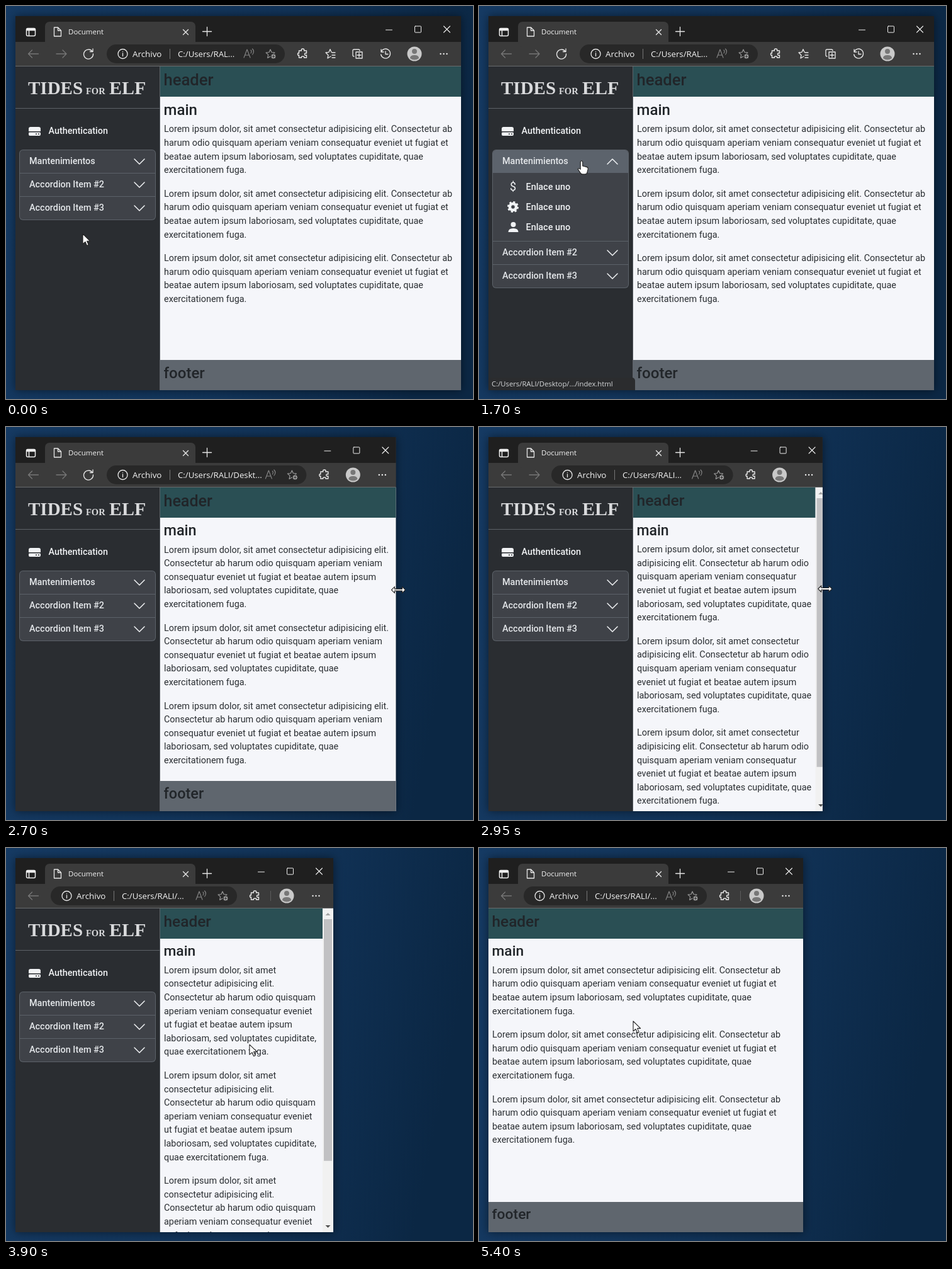
Animation, 742 px wide and 624 px high, one loop 5.55 s. Source, as an HTML page with a canvas:

```html
<!DOCTYPE html>
<html lang="es">
<head>
<meta charset="utf-8">
<title>Responsive sidebar</title>
<style>
html, body { margin: 0; width: 742px; height: 624px; overflow: hidden; background: #10305a }
canvas { display: block }
</style>
</head>
<body>
<canvas id="stage" width="742" height="624"></canvas>
<script>
const c = document.getElementById('stage').getContext('2d');
const LOOP = 5550, LEFT = 15, TOP = 96, BOTTOM = 610;
const UI = '"Open Sans", "Noto Sans", sans-serif', BODY = 'Roboto, sans-serif';
const LOREM = ('Lorem ipsum dolor, sit amet consectetur adipisicing elit. Consectetur ab harum odio ' +
  'quisquam aperiam veniam consequatur eveniet ut fugiat et beatae autem ipsum laboriosam, ' +
  'sed voluptates cupiditate, quae exercitationem fuga.').split(' ');

// Right edge of the window: [time, x]
const EDGE = [[2350, 723], [2950, 546], [3150, 515], [3300, 515], [3420, 520], [4600, 520], [4660, 515],
  [4760, 515], [4820, 520], [4900, 520], [4960, 515]];
// Pointer hot spot: [time, x, y]
const POINTER = [[0, 122, 362], [120, 122, 350], [500, 128, 202], [780, 130, 200], [1000, 159, 245],
  [1180, 159, 245], [1350, 115, 288], [1500, 112, 318], [1660, 162, 246], [1780, 164, 246],
  [2150, 727, 261], [2350, 727, 261], [2950, 550, 257], [3150, 519, 258], [3300, 519, 258],
  [3420, 524, 260], [3500, 505, 268], [3900, 387, 312], [4150, 375, 322], [4400, 510, 283],
  [4550, 524, 285], [4600, 524, 285], [4660, 519, 285], [4760, 519, 285], [4820, 524, 284],
  [4900, 524, 284], [4960, 519, 284], [5050, 519, 284], [5300, 376, 279], [5350, 300, 273], [5400, 245, 275]];
const STATUS = [[500, 0], [580, 1], [1100, 1], [1200, 0], [1380, 0], [1440, 1], [1720, 1], [1820, 0]];

function at(keys, t, i = 1) {
  const n = keys.findIndex(k => k[0] > t);
  if (n < 0) return keys[keys.length - 1][i];
  if (n === 0) return keys[0][i];
  const a = keys[n - 1], b = keys[n];
  return a[i] + (b[i] - a[i]) * (t - a[0]) / (b[0] - a[0]);
}
const clamp = v => Math.max(0, Math.min(1, v));

function rect(x, y, w, h, fill, radius = 0) {
  c.fillStyle = fill;
  c.beginPath();
  c.roundRect(x, y, w, h, radius);
  c.fill();
}
function text(s, x, y, font, fill) {
  c.font = font;
  c.fillStyle = fill;
  c.fillText(s, x, y);
}
// Draw an SVG path moved to x, y
function icon(d, x, y, stroke = '#e8e8e8', width = 1.3, fill) {
  const p = new Path2D(d);
  c.save();
  c.translate(x, y);
  c.lineJoin = c.lineCap = 'round';
  if (fill) { c.fillStyle = fill; c.fill(p); }
  if (stroke) { c.strokeStyle = stroke; c.lineWidth = width; c.stroke(p); }
  c.restore();
}
const ring = r => `M${-r} 0a${r} ${r} 0 1 0 ${2 * r} 0a${r} ${r} 0 1 0 ${-2 * r} 0z`;
const CROSS = 'M-4-4l8 8M4-4l-8 8';
const STAR = 'M0-7l2 4.5 5 .6-3.7 3.3 1 5-4.3-2.5-4.3 2.5 1-5-3.7-3.3 5-.6z';

const TOOLS = {
  puzzle: 'M-6-5h4q-1-3 2-3t2 3h4v4q-3-1-3 1.500t3 1.500v4h-4q1-2-2-2t-2 2h-4v-4q-2 1-2-1.500t2-1.500z',
  star: 'M1 4l-5 3 1-5-4-4 5-.7 2-4.600 2 4.600M3-2h5M3 2h5M3 6h5',
  boxes: 'M-3-3h10v10h-10zM-6 4q-2 0-2-2v-7q0-2 2-2h7q2 0 2 2M2-1v6M-1 2h6',
  history: 'M-7-3a7.500 7.500 0 1 1-.3 4M-7-7v4h4M0-4v4.500h4'
};

function titleBar(R) {
  rect(LEFT, 16, R - LEFT, 41, '#1f1f1f');
  rect(LEFT, 57, R - LEFT, 38, '#3b3b3b');
  rect(62, 25, 239, 40, '#3b3b3b', 7);
  icon('M-5-6h10q2 0 2 2v8q0 2-2 2h-10q-2 0-2-2v-8q0-2 2-2zM-7-3h14M-6-4.500h12M-3-3v9', 39.5, 41.5, '#eee', 1.5);
  icon('M-5.500-7h6l5 5v9h-11zM.5-7v5h5', 82, 41);
  text('Document', 99, 45, '500 11.500px ' + UI, '#f2f2f2');
  icon(CROSS, 285.5, 41.5);
  icon('M-7 0h14M0-7v14', 319.5, 40.5);
  icon('M-5 0h10', R - 114.5, 38, '#eee', 1);
  icon('M-4-5h8q1 0 1 1v8q0 1-1 1h-8q-1 0-1-1v-8q0-1 1-1z', R - 68.5, 37, '#eee', 1);
  icon('M-5-5l10 10M5-5l-10 10', R - 22.5, 37, '#eee', 1.1);
}

function toolbar(R) {
  let extra = 3, L = 160;
  while (extra && R - 148 - 44 * extra - L < 275) extra--;
  if (R - 148 - 44 * extra - L < 275) L = 115;
  if (R - 148 - L < 275) L = 71;
  const gap = L === 71 ? 5 : 0, end = R - 148 - 44 * extra - gap;

  const arrow = 'M8 0h-16l6-6M-8 0l6 6';
  icon(arrow, 43.5, 76, '#777');
  if (L > 71) icon('M-8 0h16l-6-6M8 0l-6 6', 88, 76, '#777');
  if (L > 115) icon('M6-4a7.500 7.500 0 1 0 1.500 4M7-8v4.500h-4.500', 131, 76);

  rect(L, 61, end - L, 30, '#282828', 15);
  icon(ring(7.5) + 'M0-1v4.500M0-3.500v.1', L + 25.5, 76);
  text('Archivo', L + 41, 80.5, '500 13.400px ' + UI, '#f4f4f4');
  rect(L + 100, 68, 1, 16, '#777');
  const chars = 12 + Math.round((end - L - 283) / 5.25);
  text('C:/Users/RALI/Desktop'.slice(0, chars) + '...', L + 113, 80.5, '500 13.200px ' + UI, '#f4f4f4');
  icon('M-7 6l5-13 5 13M-5 2h6M4-6q2 2 0 5M6.500-8q4 4 0 9', end - 58, 76, '#888', 1.1);
  icon(STAR, end - 23, 76, '#999', 1.2);
  icon(ring(4), end - 18, 80, '#282828', 1, '#aaa');
  icon('M-2 0h4M0-2v4', end - 18, 80, '#282828', 1);

  icon(TOOLS.puzzle, R - 119.5 - 44 * extra - gap, 76, '#e8e8e8', 1.4);
  ['star', 'boxes', 'history'].slice(3 - extra).forEach((name, i) =>
    icon(TOOLS[name], R - 120 - 44 * (extra - 1 - i), 76));
  if (gap) rect(R - 100, 68, 1, 16, '#5c5c5c');
  icon(ring(11.5), R - 74, 76, null, 0, '#c9c9c9');
  icon('M-7 7q0-5 7-5t7 5q-7 5-14 0z' + 'M-4-4a4 4 0 1 0 8 0a4 4 0 1 0-8 0z', R - 74, 76, null, 0, '#777');
  for (const x of [-5, 0, 5]) icon(ring(1.2), R - 27.5 + x, 76, null, 0, '#eee');
  rect(LEFT, 95, R - LEFT, 1, '#686b6d');
}

function gear(x, y) {
  c.strokeStyle = '#f1f3f5';
  for (const [r, width, dash] of [[5, 4.5, []], [7.8, 2.4, [3.2, 2.926]]]) {
    c.setLineDash(dash);
    c.lineWidth = width;
    c.beginPath();
    c.arc(x, y, r, 0, 7);
    c.stroke();
  }
  c.setLineDash([]);
}

function sidebar(t) {
  // Opens at one click and closes at the next
  const run = ms => clamp((t - 1075) / ms) - clamp((t - 1720) / ms);
  const closing = t > 1720;
  const p = closing ? 1 - run(175) : run(175), out = 1 - (1 - p) ** 2.5;
  const h = Math.round(108 * (closing ? 1 - out : out));
  const q = run(100), turn = -Math.PI * q * q * (3 - 2 * q);
  const label = '500 14.400px ' + BODY;

  rect(LEFT, TOP, 229, BOTTOM - TOP, '#2a2d31');
  rect(244, TOP, 1, BOTTOM - TOP, '#5d6268');
  const logo = (s, x, size) => text(s, x, 140, `bold ${size}px "Liberation Serif", serif`, '#d9dadc');
  logo('TIDES', 35, 29);
  logo('FOR', 127, 14.5);
  logo('ELF', 164, 30);
  rect(LEFT, 162, 229, 1, '#5d6268');

  rect(36, 192, 19, 8, '#f1f3f5', [3, 3, 0, 0]);
  rect(36, 200, 19, 6, '#f1f3f5', 2);
  rect(36, 199, 19, 1.5, '#2a2d31');
  rect(47, 202.5, 2, 1.5, '#2a2d31');
  rect(51, 202.5, 2, 1.5, '#2a2d31');
  text('Authentication', 67.5, 203, label, '#f1f3f5');

  rect(21, 228, 217, 112 + h, '#5c6269', 6);
  rect(22, 229, 215, 110 + h, '#3f4248', 5);
  if (t > 1075 && !closing) rect(22, 229, 215, 36, '#5c636c', [5, 5, 0, 0]);
  if (h) {
    c.save();
    c.beginPath();
    c.rect(22, 265, 215, h);
    c.clip();
    for (let i = 0; i < 3; i++) text('Enlace uno', 74.5, 292 + 32 * i, label, '#f1f3f5');
    text('$', 49, 293, '18px ' + BODY, '#f1f3f5');
    gear(54, 319);
    icon(ring(4), 54.5, 347, null, 0, '#f1f3f5');
    icon('M-8 7q0-6 8-6t8 6z', 54.5, 352, null, 0, '#f1f3f5');
    c.restore();
  }
  ['Mantenimientos', 'Accordion Item #2', 'Accordion Item #3'].forEach((s, i) => {
    const y = 228 + 37 * i + (i ? h : 0);
    if (i) rect(22, y, 215, 1, '#5c6269');
    text(s, 37, y + 23, label, '#e4e7ea');
    c.save();
    c.translate(212, y + 19);
    c.rotate(i ? 0 : turn);
    icon('M-8-4l8 8 8-8', 0, 0, '#f1f3f5', 1.5);
    c.restore();
  });

  c.globalAlpha = at(STATUS, t);
  rect(LEFT, 590, 233, 20, '#2b2c2e', [0, 5, 0, 0]);
  text('C:/Users/RALI/Desktop/.../index.html', 20, 604, '11.300px ' + UI, '#d5d7d9');
  c.globalAlpha = 1;
  return h;
}

function wrap(width) {
  c.font = '14.400px ' + BODY;
  const lines = [];
  let line = '';
  for (const word of LOREM) {
    const next = line ? line + ' ' + word : word;
    if (c.measureText(next).width > width) { lines.push(line); line = word; }
    else line = next;
  }
  return [...lines, line];
}

function page(x, R) {
  const grow = .006 * (R - LEFT), big = 21.4 + grow, mid = 19.8 + grow;
  const start = 150 + 1.2 * mid + 5.8;
  const layout = right => {
    const lines = wrap(right - x - 11), pitch = lines.length * 21.6 + 16;
    return { right, lines, pitch, foot: Math.max(562, start + 3 * pitch + 6) };
  };
  let view = layout(R);
  const scrolls = view.foot > 562;
  if (scrolls) view = layout(R - 17);
  const { right, lines, pitch, foot } = view;
  const heading = (s, y, size) =>
    text(s, x + 5.5, Math.round(y + .941 * size), `500 ${size}px ${BODY}`, '#212529');

  c.save();
  c.beginPath();
  c.rect(x, TOP, R - x, BOTTOM - TOP);
  c.clip();
  rect(x, TOP, R - x, BOTTOM - TOP, '#f5f6fa');
  rect(x, TOP, right - x, 48, '#2a4f54');
  heading('header', 102, big);
  heading('main', 150, mid);
  for (let i = 0; i < 3; i++) lines.forEach((s, n) =>
    text(s, x + 6, Math.round(start + i * pitch + n * 21.6 + 15.7), '14.400px ' + BODY, '#2b2f33'));
  rect(x, foot, right - x, 48, '#5f666e');
  heading('footer', foot + 6, mid);
  if (scrolls) {
    rect(right, TOP, 17, BOTTOM - TOP, '#f1f1f1');
    rect(right + 2, 113, 13, 480 * 514 / (foot + 48 - TOP), '#c1c1c3');
    icon('M-4 2l4-4 4 4z', right + 8.5, 105, null, 0, '#a3a3a3');
    icon('M-4-2l4 4 4-4z', right + 8.5, 601, null, 0, '#505050');
  }
  c.restore();
}

const SHAPES = {
  arrow: 'M0 0v16l4-3.500 2.600 6 2.600-1.100-2.600-6h5z',
  hand: 'M0 0q2 0 2 2v6l6.500 1.600q2.500.7 2 3.500l-1.300 5q-.5 3-3.500 3h-4q-2 0-3.200-2l-4-6q1.500-2.300 4 .2v-11.300q0-2 1.500-2z',
  resize: 'M-11 0l5-5v3.500h12v-3.500l5 5-5 5v-3.500h-12v3.500z'
};

function pointer(t, edge, menu) {
  const x = at(POINTER, t), y = at(POINTER, t, 2);
  const onLink = x < 238 && (y > 185 && y < 212 || y > 228 && y < 340 + menu);
  const kind = Math.abs(x - edge) < 6 ? 'resize' : onLink ? 'hand' : 'arrow';
  icon(SHAPES[kind], x, y, '#222', 1.1, '#fff');
}

function draw(t) {
  const edge = at(EDGE, t), R = at(EDGE, t - 20); // contents trail the frame while resizing
  const sky = c.createLinearGradient(0, 0, 742, 150);
  sky.addColorStop(0, '#153a63');
  sky.addColorStop(.6, '#113358');
  sky.addColorStop(1, '#0b2744');
  rect(0, 0, 742, 624, sky);

  c.save();
  c.shadowColor = 'rgba(0,0,0,.5)';
  c.shadowBlur = 14;
  rect(LEFT, 16, edge - LEFT, 594, '#3b3b3b');
  c.restore();

  c.save();
  c.beginPath();
  c.rect(LEFT, 16, edge - LEFT, 594);
  c.clip();
  titleBar(R);
  toolbar(R);
  const wide = R >= 518;
  page(wide ? 245 : LEFT, R);
  const menu = wide ? sidebar(t) : 0;
  c.restore();
  pointer(t, edge, menu);
}

const begin = performance.now();
function tick() {
  draw((performance.now() - begin) % LOOP);
  requestAnimationFrame(tick);
}
tick();
</script>
</body>
</html>
```
